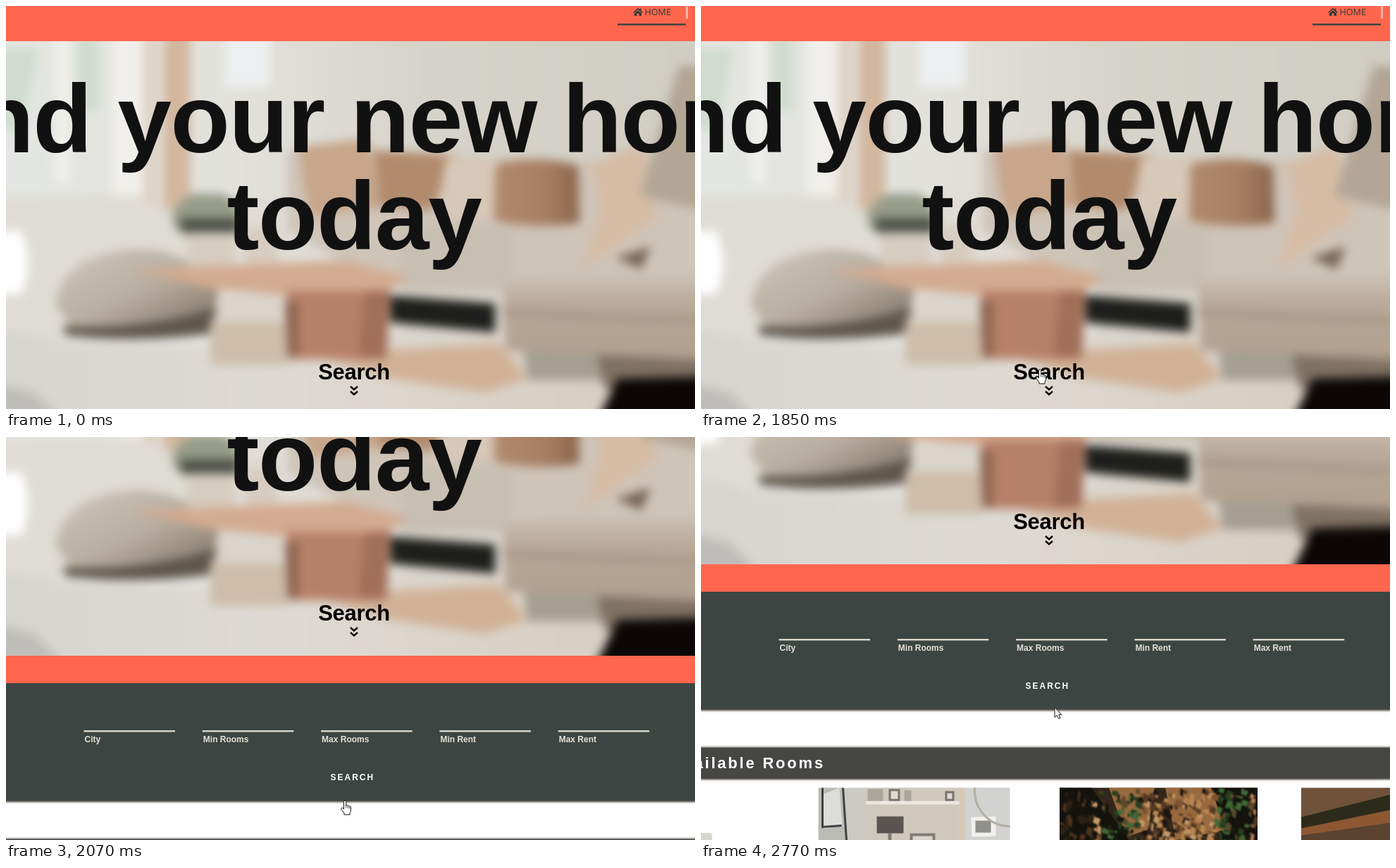
An HTML page that plays this animation: 978x573 px, repeating every 2850 ms.

```html
<!DOCTYPE html>
<html lang="en">
<head>
<meta charset="utf-8">
<title>Find your new home</title>
<style>
  html, body { margin: 0; width: 100%; height: 100%; overflow: hidden; background: #fefefe; }
  #stage { display: block; width: 978px; height: 573px; }
  text { font-family: "Liberation Sans", Arial, sans-serif; font-weight: bold; font-kerning: none; }
  filter { color-interpolation-filters: sRGB; }
  .title { font-size: 138px; letter-spacing: -.01em; text-anchor: middle; fill: #111; }
  .search { font-size: 31px; letter-spacing: -.01em; text-anchor: middle; }
  .nav { font: 12.6px "Open Sans", "Noto Sans", sans-serif; fill: #2f3a38; }
  .label { font-size: 12px; fill: #e4e0d6; }
  .button { font-size: 12px; letter-spacing: 2px; fill: #fff; }
  .rooms { font-size: 22px; letter-spacing: 2.8px; text-anchor: end; fill: #fff; }
</style>
</head>
<body>
<svg id="stage" viewBox="0 0 978 573">
  <defs>
    <filter id="soft" filterUnits="userSpaceOnUse" x="-60" y="-10" width="1100" height="660"><feGaussianBlur stdDeviation="7"/></filter>
    <filter id="fine"><feGaussianBlur stdDeviation=".8"/></filter>
    <filter id="shade" filterUnits="userSpaceOnUse" x="-20" y="600" width="1020" height="310"><feGaussianBlur stdDeviation="1.8"/></filter>
    <linearGradient id="wall">
      <stop offset="0" stop-color="#e3e7e3"/><stop offset=".35" stop-color="#e2e1dc"/>
      <stop offset=".6" stop-color="#d6d3ca"/><stop offset="1" stop-color="#cfccc2"/>
    </linearGradient>
    <linearGradient id="floor">
      <stop offset="0" stop-color="#d6d4cf"/><stop offset=".4" stop-color="#dedad3"/><stop offset="1" stop-color="#d6cabd"/>
    </linearGradient>
    <linearGradient id="pouf" x2="1" y2="1">
      <stop offset="0" stop-color="#cfc8be"/><stop offset=".5" stop-color="#b8ada0"/><stop offset="1" stop-color="#75695c"/>
    </linearGradient>
    <linearGradient id="pillow">
      <stop offset="0" stop-color="#b08a6e"/><stop offset=".6" stop-color="#a87e62"/><stop offset="1" stop-color="#8a664c"/>
    </linearGradient>
    <linearGradient id="couch" x2="0" y2="1">
      <stop offset="0" stop-color="#d0c7bc"/><stop offset=".4" stop-color="#b7a897"/><stop offset="1" stop-color="#b09f8d"/>
    </linearGradient>
  </defs>

  <g id="page">
    <rect width="978" height="1000" fill="#fefefe"/>

    <svg y="50" width="978" height="531" viewBox="0 50 978 531">
      <g filter="url(#soft)">
        <path d="M-50 0H1030V640H-50Z" fill="url(#wall)"/>
        <path d="M-50 270H560V470H-50Z" fill="#dfdcd5"/>
        <path d="M-50 60H45L25 175H-50ZM100 40h30v110h-25z" fill="#d0dccf"/>
        <path d="M70 40h22v210H70ZM150 40h55v230h-55z" fill="#f0efeb"/>
        <path d="M224 20h38v270h-38z" fill="#d3b79f"/>
        <path d="M195 30h22v250h-22z" fill="#ddd2c4"/>
        <path d="M310 40h65v75h-65z" fill="#edf0f0"/>
        <path d="M-50 320H22Q40 365 22 410H-50Z" fill="#fff"/>
        <path d="M400 205L980 225V400H545L400 320Z" fill="#cfc4b8"/>
        <path d="M415 200L515 188 530 285 430 300Z" fill="#c7a68b"/>
        <path d="M522 205L640 212 605 290 530 285Z" fill="#b28b6d"/>
        <path d="M625 215H700V300H610Z" fill="#d7c8b8"/>
        <path d="M695 225Q755 210 812 228L814 308Q750 318 693 305Z" fill="url(#pillow)"/>
        <path d="M830 225L905 195 925 300 820 372 845 290Z" fill="#d6bca5"/>
        <path d="M955 85H1030V300L900 270Z" fill="#b3a695"/>
        <path d="M560 312H720V405H560Z" fill="#c8bfb3"/>
        <path d="M-50 455L120 480 400 490 700 455 1030 500V640H-50Z" fill="url(#floor)"/>
        <path d="M-50 530L40 550 130 640H-50Z" fill="#bfbdb9"/>
        <path d="M546 412L694 423V464L546 450Z" fill="#1e1f1c"/>
        <path d="M430 495L700 480 740 530 680 550 545 530Z" fill="#d1b298"/>
        <path d="M735 492H850V532H740Z" fill="#a49f92"/>
        <path d="M838 492H1030V545H850Z" fill="#7f7163"/>
        <path d="M705 395Q760 365 1030 375V505L710 490Z" fill="url(#couch)"/>
        <path d="M705 435L1030 450" stroke="#a69584" stroke-width="8"/>
        <path d="M865 358L915 342 902 374Z" fill="#776453"/>
        <path d="M70 425Q80 350 190 345 300 355 310 440 280 475 100 465Z" fill="url(#pouf)"/>
        <path d="M80 455Q190 462 297 430L288 466Q180 480 85 468Z" fill="#5d564b"/>
        <path d="M235 300Q250 260 290 268 330 260 335 315 290 330 240 318Z" fill="#969c89"/>
        <path d="M248 302H330V324H250Z" fill="#4d5147"/>
        <path d="M255 322H325V375H260ZM340 315H385V380H340Z" fill="#d7ccc0"/>
        <path d="M290 445H400V510H290Z" fill="#cdbda9"/>
        <path d="M298 412H398V450H298Z" fill="#dad4cb"/>
        <path d="M180 375L480 362 570 385 540 408 400 412 290 402Z" fill="#d3ab91"/>
        <path d="M398 405H546L540 502H402Z" fill="#b78068"/>
        <path d="M510 405H546L540 500H500Z" fill="#a26e58"/>
        <path d="M396 420H414V500H400Z" fill="#8d6350"/>
        <path d="M815 640L868 530 1030 526V640Z" fill="#0c0706"/>
      </g>
    </svg>

    <path d="M0 0H978V50H0ZM0 581H978V621H0Z" fill="#ff664d"/>
    <path d="M965 0h3v18h-3z" fill="#f3b7a5"/>
    <path d="M868 25h97v2.5h-97z" fill="#3d4543"/>
    <path d="M890 9L897 3 899.5 5V3.5H901.500V6.800L904 9 903 10 897 5 891 10ZM892 10.200L897 6.200 902 10.200V14H898.500V10.500H895.500V14H892Z" fill="#2f3a38"/>
    <text class="nav" x="906.500" y="13">HOME</text>

    <text class="title" x="494" y="208">Find your new home</text>
    <text class="title" x="494" y="346">today</text>
    <g id="link">
      <text class="search" x="494" y="531">Search</text>
      <path d="M489 541l5 4.500 5-4.500M489 548l5 4.500 5-4.500" fill="none" stroke="#000" stroke-width="2.400"/>
    </g>

    <path d="M-10 640H990V789H-10ZM-10 841H990V887H-10Z" fill="#40382f" filter="url(#shade)"/>
    <path d="M0 620H978V787H0Z" fill="#3d4543"/>
    <path d="M0 842H978V885.500H0Z" fill="#464645"/>
    <g id="fields"></g>
    <text class="button" x="460.500" y="758">SEARCH</text>
    <text class="rooms" x="176" y="871">Available Rooms</text>

    <path d="M0 963H14Q17 965 15 980H0Z" fill="#d6d6cf"/>
    <svg x="166.500" y="898.500" width="272" height="90">
      <path d="M0 0H272V90H0Z" fill="#cbcac5"/>
      <path d="M0 0H35L42 90H0Z" fill="#bcbcb7"/>
      <path d="M6 10L30 0 34 55 8 58Z" fill="#dcdcd8"/>
      <path d="M35 0L41 90M6 0V56L33 54" stroke="#3f4142" stroke-width="3" fill="none"/>
      <path d="M68 0H204V90H68Z" fill="#cfc8bc"/>
      <path d="M199 0h9v90h-9z" fill="#d8c9b5"/>
      <path d="M208 0h64v90h-64z" fill="#d2d2d0"/>
      <path d="M68 19H200V24H68Z" fill="#ece8e0"/>
      <path d="M70 2h22v17H70ZM122 4h10v15h-10z" fill="#aaa69c"/>
      <path d="M100 2h16v17h-16zM180 5h13v14h-13z" fill="#77736c"/>
      <path d="M103 5h10v11h-10zM183 8h7v8h-7z" fill="#dedbd4"/>
      <path d="M83 41h38v24H83Z" fill="#5a5552"/>
      <path d="M99 65h5v25h-5zM130 65h36v25h-36z" fill="#817c75"/>
      <path d="M134 69h28v21h-28z" fill="#d9d5cd"/>
      <path d="M217 42l35-1v28l-34 1z" fill="#f1f0ed"/>
      <path d="M223 47h22v17h-22z" fill="#8f8f8c"/>
      <circle cx="272" cy="5" r="50" fill="none" stroke="#b3aea5" stroke-width="3"/>
    </svg>
    <svg x="509" y="898.500" width="281" height="90">
      <path d="M0 0H281V90H0Z" fill="#33261a"/>
      <path d="M0 0H45L110 90H0ZM215 0H281V90H235Z" fill="#14120d"/>
      <path d="M70 0H135L125 60 95 70ZM150 0H215L235 60 165 75Z" fill="#996a3f"/>
      <g id="rocks" filter="url(#fine)"></g>
    </svg>
    <svg x="852" y="898.500" width="126" height="90">
      <path d="M0 0H126V90H0Z" fill="#70523a"/>
      <path d="M0 42L126 10V32L0 58Z" fill="#2c2b1b"/>
      <path d="M0 58L126 32V50L0 68Z" fill="#8d5732"/>
      <path d="M0 68L126 50V90H0Z" fill="#5b4231"/>
    </svg>
  </g>

  <g id="cursor" fill="#fff" stroke="#111" stroke-linejoin="round">
    <path id="arrow" d="M0 0V14L3.300 11 5.600 16 8 15 5.800 10.300H10Z"/>
    <g id="hand" transform="translate(-6 -.5)">
      <path d="M4.500 2a1.600 1.600 0 0 1 3.200 0V7.200q2-.8 2.600.6 2-.5 2.400.7 1.800-.2 1.800 1.600V14q0 2.500-1.500 4V20.500H5V18.500L1 13q-1-2 .6-2.400 1.500 0 2.900 2Z"/>
      <path d="M7.700 7V11M10.300 8V11.500M12.700 9V12" stroke-width=".8"/>
    </g>
  </g>
</svg>

<script>
const LOOP = 2850;
const TICKS = [0, 420, 500, 740, 820, 900, 980, 1060, 1130, 1210, 1290, 1370, 1450, 1530, 1610,
  1690, 1770, 1850, 1910, 1990, 2070, 2150, 2230, 2310, 2630, 2710, 2770];
const WOBBLE = [0, 8, -6, 4, -2, 1, 0];
const HOVER = 1059, CLICK = 1850, SETTLED = 2310;

const el = id => document.getElementById(id);
const mix = (a, b, p) => a + (b - a) * p;
const ease = p => (1 - Math.cos(Math.PI * Math.min(1, Math.max(0, p)))) / 2;
const span = (t, from, to) => ease((t - from) / (to - from));
const show = (node, on) => node.setAttribute("visibility", on ? "visible" : "hidden");
const move = (node, x, y) => node.setAttribute("transform", `translate(${x} ${y})`);

el("fields").innerHTML = ["City", "Min Rooms", "Max Rooms", "Min Rent", "Max Rent"].map((name, i) => {
  const x = 110.5 + i * 168.3;
  return `<rect x="${x}" y="687" width="129.5" height="2.4" fill="#dcd8cc"/>
    <text class="label" x="${x + 1}" y="704">${name}</text>`;
}).join("");

let seed = 7;
const random = () => (seed = seed * 16807 % 2147483647) / 2147483647;

function rock() {
  const x = random() * 281, y = random() * 90, w = 2 + random() * 7, h = 3 + random() * 9;
  const leafy = Math.abs(x - 85) < 28 || Math.abs(x - 245) < 25;
  const colors = leafy ? ["#3f6a35", "#24401f", "#17150f", "#5a4a2c"]
    : x < 45 ? ["#17130e", "#4d321d", "#2c2115"] : ["#b98450", "#7c5230", "#1d150f", "#c49a6a", "#553a24"];
  const color = colors[Math.floor(random() * colors.length)];
  return `<path d="M${x} ${y}l${w} ${h / 3} ${-w / 3} ${h} ${-w} ${-h / 2}z" fill="${color}"/>`;
}
el("rocks").innerHTML = Array.from({ length: 420 }, rock).join("");

function wobble(t) {
  if (t < HOVER || t >= CLICK) return 0;
  const step = (t - HOVER) / 1000 * 6, i = Math.floor(step);
  return mix(WOBBLE[i], WOBBLE[i + 1], ease(step - i));
}

function pointer(t) {
  if (t < 500) return [828, 454];
  if (t < SETTLED) {
    const p = span(t, 680, 1130);
    return [mix(767, 481, p), mix(444, 517, p)];
  }
  const p = span(t, 2560, 2770);
  return [mix(480, 502, p), mix(517, 384.500, p)];
}

function draw(t) {
  const hand = t >= 1060 && t < SETTLED;
  move(el("page"), 0, -Math.round(400 * span(t, 1860, 2202)));
  move(el("link"), 0, wobble(t));
  move(el("cursor"), ...pointer(t));
  show(el("arrow"), t >= 420 && !hand);
  show(el("hand"), hand);
}

let last = -1;
function frame() {
  const now = performance.now() % LOOP;
  const t = TICKS.findLast(tick => tick <= now);
  if (t !== last) draw(last = t);
  requestAnimationFrame(frame);
}
frame();
</script>
</body>
</html>
```
